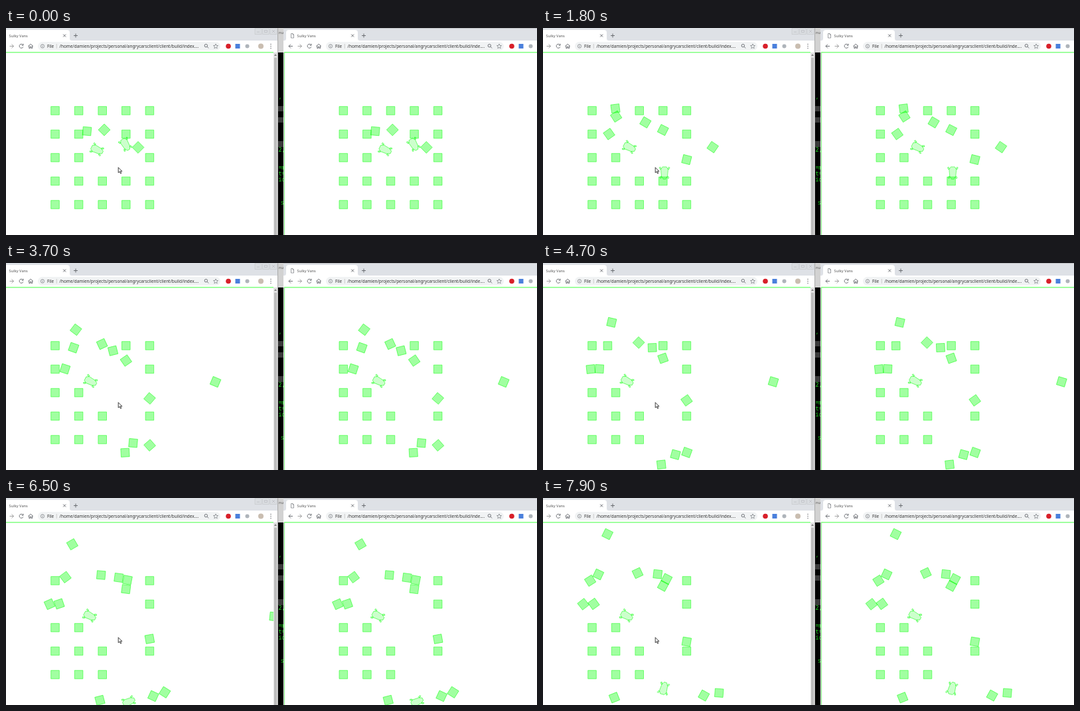
These frames come from a looping animation (800x313 px, 8000 ms). An HTML page:

```html
<!DOCTYPE html>
<html lang="en">
<head>
<meta charset="utf-8">
<title>Sulky Vans</title>
<style>
html, body { margin: 0; width: 100%; height: 100%; overflow: hidden; background: #fff; }
svg { display: block; }
text { font: 6.4px "Noto Sans", "Open Sans", sans-serif; fill: #333; white-space: pre; }
.title { font-size: 5.7px; fill: #555; }
.term { font: 8px "Noto Sans Mono", "DejaVu Sans Mono", monospace; fill: #2d2; }
.icon { fill: none; stroke: #5f6368; stroke-width: .9; }
.thin { stroke-width: .6; }
.box, .car { fill: #0f0; fill-opacity: .37; stroke: #0f0; stroke-opacity: .6; stroke-width: .8; }
.car { fill-opacity: .2; }
.edge { fill: none; stroke: #6f6; stroke-width: 1.3; }
</style>
</head>
<body>
<svg width="800" height="313" viewBox="0 0 800 313">
  <defs>
    <!-- tab and navigation buttons, shared by both windows -->
    <g id="bar">
      <path d="M-15 19Q-12 19-12 16V7Q-12 3-8 3H92Q96 3 96 7V16Q96 19 99 19Z" fill="#fff"/>
      <path class="icon thin" d="M-4.500 8.500h2.500l1.500 1.500v5h-4zM-2 8.500v1.500h1.500"/>
      <text class="title" x="4.600" y="13.600">Sulky Vans</text>
      <path class="icon" d="M86.200 9.500l4 4m0-4l-4 4M102 11.500h6m-3-3v6"/>
      <path class="icon" d="M-2 27.500h-6m3-3l-3 3 3 3"/>
      <path class="icon" style="stroke:#999" d="M5.500 27.500h6m-3-3l3 3-3 3"/>
      <path class="icon" d="M25.500 25.500a3 3 0 1 0 .4 3M26 23.800v2.400h-2.400"/>
      <path class="icon" d="M33.500 27.500l3.700-3.200 3.700 3.200M34.800 27v3.600h1.600v-2.300h1.600v2.300h1.600V27"/>
    </g>
    <g id="site">
      <circle class="icon thin" cx="55" cy="27.500" r="2.700"/>
      <path class="icon thin" d="M55 27v2m0-3.500v.8"/>
      <text x="62" y="29.700">File</text>
      <path d="M76.300 24v7" stroke="#bbb" stroke-width=".7"/>
    </g>
    <!-- zoom, star and extension buttons -->
    <g id="tools">
      <circle class="icon" cx="301.300" cy="26.700" r="2.200"/>
      <path class="icon" d="M303 28.300l2.200 2.200"/>
      <path class="icon thin" d="M316 24l1 2.400 2.500.2-1.900 1.700.6 2.500-2.200-1.300-2.200 1.300.6-2.500-1.900-1.700 2.500-.2z"/>
      <circle cx="335" cy="27.500" r="3.800" fill="#d8202a"/>
      <rect x="345.500" y="24" width="7" height="7" fill="#4a80dc"/>
      <circle cx="363.500" cy="27.500" r="3" fill="#aeb4ba"/>
    </g>
  </defs>

  <!-- terminal visible between the windows -->
  <rect x="409" width="11" height="37" fill="#d2d2d2"/>
  <text class="title" x="411" y="9">nu</text>
  <rect x="409" y="37" width="11" height="276" fill="#000"/>
  <g id="term">
    <path d="M410 118h9v8h-9zM410 135h9v8h-9zM410 171h9v9h-9z" fill="#3a3a3a"/>
    <text class="term" x="410.500" y="107">,</text>
    <text class="term" x="410.500" y="187">2,</text>
    <text class="term" x="410.500" y="214">=m</text>
    <text class="term" x="410.500" y="223">t=</text>
    <text class="term" x="410.500" y="232">ic</text>
    <text class="term" x="414" y="267">s</text>
  </g>

  <!-- left window -->
  <svg width="410" height="313">
    <rect width="410" height="19" fill="#dee1e6"/>
    <path d="M375 .5h10v9h-10zM386.500 .5h10v9h-10zM398 .5h10v9h-10z" fill="#dadde1" stroke="#c4c6ca" stroke-width=".6"/>
    <path d="M378 6h4M389.500 3.500h4v3h-4zM401 3l4 4m0-4l-4 4" fill="none" stroke="#b4b6ba" stroke-width=".6"/>
    <rect y="19" width="410" height="18" fill="#fff"/>
    <rect x="48" y="21" width="275" height="13" rx="6.500" fill="#f1f3f4"/>
    <use href="#bar"/><use href="#site"/><use href="#tools"/>
    <text x="80.600" y="29.700">/home/damien/projects/personal/angrycarsclient/client/build/index....</text>
    <circle cx="384" cy="27.500" r="4" fill="#c9bdb0"/>
    <path d="M399 24.500v.01M399 27.500v.01M399 30.500v.01" stroke="#5f6368" stroke-width="1.400" stroke-linecap="round"/>
    <rect y="37" width="403" height="276" fill="#fff"/>
    <rect x="403" y="37" width="7" height="276" fill="#e2e2e2"/>
    <path d="M404 45h4v268h-4z" fill="#bdbdbd"/>
    <path d="M404 42l2-2.500 2 2.500z" fill="#777"/>
    <path d="M409.500 0v313" stroke="#aaa"/>
  </svg>
  <svg y="36" width="403" height="277" viewBox="0 36 403 277">
    <g id="world"></g>
    <path class="edge" d="M0 36.800h403"/>
  </svg>
  <path d="M169.200 210.800v8l1.900-1.700 1.400 3 1.300-.6-1.400-2.900h2.500z" fill="#fff" stroke="#111" stroke-width=".8"/>

  <!-- right window -->
  <svg x="418" width="382" height="313" viewBox="418 0 382 313">
    <rect x="418" width="382" height="19" fill="#dee1e6"/>
    <path d="M418 .3h382" stroke="#aaa" stroke-width=".7"/>
    <rect x="418" y="19" width="382" height="294" fill="#fff"/>
    <rect x="482" y="21" width="268" height="13" rx="6.500" fill="#f1f3f4"/>
    <use href="#bar" x="434"/><use href="#site" x="434"/><use href="#tools" x="427"/>
    <text x="514.600" y="29.700">/home/damien/projects/personal/angrycarsclient/client/build/inde....</text>
  </svg>
  <svg x="419" y="36" width="381" height="277" viewBox="-15.300 36 381 277">
    <use href="#world"/>
    <path class="edge" d="M-15 313V36.800H366"/>
  </svg>
</svg>

<script>
const LOOP = 8, STEP = .1, SCROLL_AT = 6.5;
const world = document.getElementById('world');
const term = document.getElementById('term');
const bodies = [];

const BOX = 'M-6.300-6.300H6.300V6.300H-6.300Z';
const wheel = (x, y) => `M${x} ${y}l${Math.sign(x) * 2.8} ${Math.sign(y) * 1.4}l${-Math.sign(x)} ${Math.sign(y) * 1.5}l${-Math.sign(x) * 2.8} ${-Math.sign(y) * 1.4}z`;
const CAR = 'M9.500-2V2L5 4.500-5 5.500-9 3V-3L-5-5.500 5-4.500Z' +
  wheel(6, -4) + wheel(6, 4) + wheel(-6, -5) + wheel(-6, 5);

// A body floats without friction: every hit sets a new velocity and spin
class Body {
  constructor(cls, d, x, y, angle = 0) {
    this.el = document.createElementNS('http://www.w3.org/2000/svg', 'path');
    this.el.setAttribute('class', cls);
    this.el.setAttribute('d', d);
    world.append(this.el);
    Object.assign(this, { x, y, angle, hits: [] });
    bodies.push(this);
  }
  hit(at, vx, vy, spin) {
    this.hits.push({ at, vx, vy, spin });
    return this;
  }
  pose(t) {
    let { x, y, angle } = this;
    this.hits.forEach((h, i) => {
      const end = this.hits[i + 1]?.at ?? LOOP;
      const dt = Math.max(0, Math.min(t, end) - h.at);
      x += h.vx * dt;
      y += h.vy * dt;
      angle += h.spin * dt;
    });
    return [x, y, angle];
  }
  draw(t) {
    const [x, y, angle] = this.pose(t);
    this.el.setAttribute('transform', `translate(${x} ${y}) rotate(${angle})`);
  }
}

const box = (x, y, angle) => new Body('box', BOX, x, y, angle);
const cell = (col, row) => box(74 + 35.6 * col, 125 + 35.5 * row);
const car = (x, y, angle) => new Body('car', CAR, x, y, angle);

// Boxes that stay in the grid
for (const [col, row] of '40 41 02 12 03 13 23 43 04 14 24'.split(' ')) cell(col, row);

// Upper left group
cell(1, 1).hit(0, -5.6, -.1, -19.5).hit(4.1, -2.7, 0, -12);
cell(0, 1).hit(4.1, -3.5, 0, -10);
box(122, 156, 5).hit(0, -7, -14.2, 39).hit(1.5, -4.4, -3, -20);
cell(1, 0).hit(1.5, -1.95, -11, -24);
cell(0, 0).hit(6.5, -2.1, 0, -23);

// Upper middle group
box(148, 154, 45).hit(0, 3.5, -6.3, 42).hit(2.55, 3.6, -4.6, 12).hit(5.6, 2.1, -3.8, -1);
cell(2, 0).hit(2.55, -.5, -2.15, -21.5);
cell(3, 1).hit(0, 0, -3.5, 15);
cell(3, 0).hit(5.6, 2.4, -1.1, 12);

// Right side
box(199, 180.5, 45).hit(0, 31.5, -.2, -6);
cell(4, 2).hit(.8, 0, 3, 14);

// Pushed down, then knocked apart by the returning car
cell(3, 3).hit(1.95, 3, 33, -9).hit(2.6, 8, 17.5, 10).hit(5.3, 14.6, -.6, 3);
cell(3, 4).hit(2.6, -1.2, 18, -3).hit(5, -24.3, -2.9, -5);
cell(4, 4).hit(2.9, .2, 10.8, 61).hit(5.3, 18.6, .7, -20);

// One car coasts to a stop, the other drives out of view and backs in again
car().pose = t => {
  const left = Math.exp(-t / 1.9);
  return [125.8 + 11.2 * left, 178 + 6 * left, 28 - 2 * left];
};
car(180, 176, 60).hit(0, -5, 28, 60).hit(1, 10, 18.7, -37).hit(2.5, 7, 100, 3)
  .hit(3.6, 8.3, -16.6, -57).hit(5.2, -20, -5.7, -1).hit(7.2, 15.7, -23, -70);

function draw(now) {
  const t = Math.floor(now / 1000 % LOOP / STEP) * STEP;
  for (const body of bodies) body.draw(t);
  term.setAttribute('transform', `translate(0 ${t < SCROLL_AT ? 0 : -18})`);
  requestAnimationFrame(draw);
}
draw(0);
</script>
</body>
</html>
```
